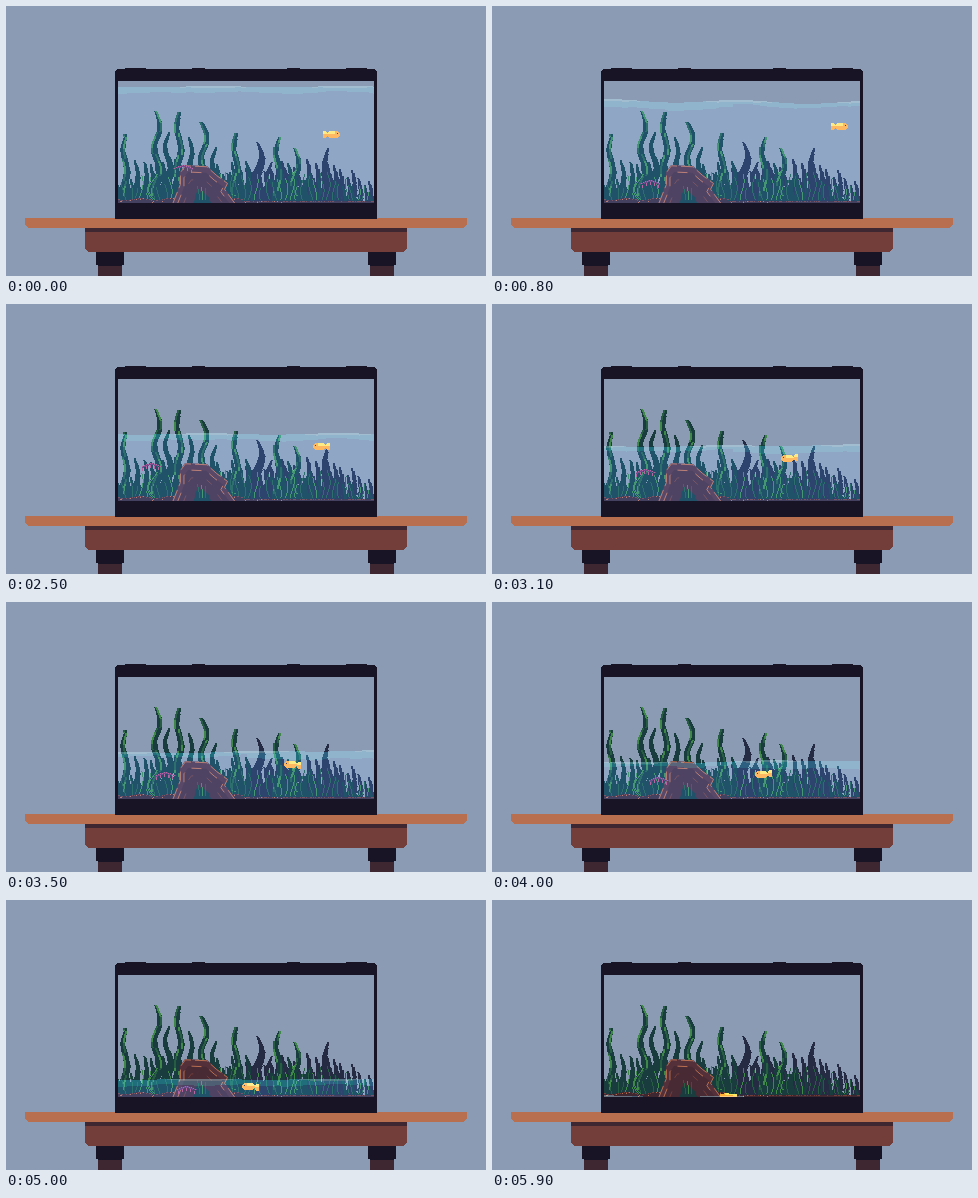
Animation, 480 px wide and 270 px high, one loop 6 s. Source, as an HTML page with a canvas:

```html
<!DOCTYPE html>
<html lang="en">
<head>
<meta charset="utf-8">
<title>Draining aquarium</title>
<style>
  html, body { margin: 0; width: 100%; height: 100%; overflow: hidden; background: #8b9bb4; }
  canvas { display: block; width: 100vw; height: 100vh; image-rendering: pixelated; }
</style>
</head>
<body>
<canvas id="stage" width="480" height="270"></canvas>
<script>
const LOOP = 6000, STEP = 100;
const LEFT = 112, RIGHT = 368, TOP = 75, FLOOR = 197, CENTER = 240;
const INK = '#181425', WALL = '#8b9bb4', MAROON = '#3e2731', BROWN = '#733e39', CLAY = '#b86f50';
const TEAL = '#193c3e', FOREST = '#265c42', LEAF = '#3e8948', NAVY = '#262b44';
const ORANGE = '#feae34', YELLOW = '#fee761', PLUM = '#68386c', PINK = '#b55088';

const stage = document.getElementById('stage').getContext('2d');
const scene = document.createElement('canvas');
scene.width = 480;
scene.height = 270;

function box(c, color, x, y, w, h) {
  c.fillStyle = color;
  c.fillRect(Math.round(x), Math.round(y), Math.round(w), Math.round(h));
}

function inTank(c, paint) {
  c.save();
  c.beginPath();
  c.rect(LEFT, TOP, RIGHT - LEFT, FLOOR - TOP);
  c.clip();
  paint();
  c.restore();
}

function seeded(seed) {
  return () => (seed = (seed * 16807) % 2147483647) / 2147483647;
}

// Linear path through rows of [time, x, y].
function along(path, t) {
  let i = 1;
  while (i < path.length - 1 && path[i][0] < t) i++;
  const [a, b] = [path[i - 1], path[i]];
  const k = (t - a[0]) / (b[0] - a[0]);
  return [1, 2].map(n => Math.round(a[n] + (b[n] - a[n]) * k));
}

// A spike that widens downwards, swaying from side to side.
function frond(c, color, x, top, slim, flare, bend) {
  for (let y = Math.round(top); y < FLOOR; y++) {
    const d = y - top;
    const w = Math.min(slim, 2 + d / 4) + Math.max(0, d - 12) * flare;
    box(c, color, x - w / 2 - bend * Math.cos(d / 7 + 1), y, w, 1);
  }
}

function glint(c, x, top, bend) {
  for (let y = top; y < 190; y++) {
    const d = y - top, edge = x - bend * Math.cos(d / 7 + 1);
    const side = Math.sin(d / 7 + x) > 0 ? 0 : -3;
    box(c, FOREST, edge + side, y, 2, 1);
    if (Math.sin(d / 4 + x) > 0) box(c, LEAF, edge + side, y, 1.5, 1);
  }
}

function strand(c, color, x, top, sway) {
  for (let y = Math.round(top); y < 194; y++) {
    box(c, color, x + sway * Math.sin((y + x) / 6), y, 1, 1);
  }
}

const tallStems = [[119, 128], [151, 105], [173, 106], [198, 116], [230, 127],
  [253, 136], [272, 131], [290, 142], [321, 142]];

function paintThicket(c) {
  const random = seeded(91);
  const crest = x => 152 + 20 * Math.max(0, (x - 310) / 58) ** 1.3 + 7 * Math.max(0, (150 - x) / 38);

  for (let x = LEFT; x < RIGHT + 6; x += 6) {
    frond(c, x > 235 ? NAVY : TEAL, x + random() * 4, crest(x) + random() * 18, 4, 0.22, 1.5);
  }
  for (let x = LEFT; x < RIGHT + 6; x += 5) {
    frond(c, TEAL, x + random() * 4, crest(x) + 14 + random() * 16, 3, 0.25, 1.5);
  }
  tallStems.forEach(([x, top], i) => {
    const navy = x > CENTER && i % 3 === 2, bend = i % 2 ? 3 : -2;
    frond(c, navy ? NAVY : TEAL, x, top, navy ? 6 : 5, navy ? 0.2 : 0.06, bend);
    if (!navy) glint(c, x, top, bend);
    frond(c, navy ? NAVY : TEAL, x + 11, top + 20 + random() * 8, 4, 0.12, -bend);
  });
  for (let x = LEFT + 3; x < RIGHT; x += 6) {
    const bright = random() < 0.4;
    strand(c, bright ? LEAF : FOREST, x + random() * 4, crest(x) + 12 + random() * 18, 2);
  }
  strand(c, LEAF, 146, 168, 5);
  strand(c, LEAF, 147, 168, 5);
}

function paintGravel(c) {
  const random = seeded(37);
  for (let x = LEFT; x < RIGHT; x++) {
    const h = x < 236 ? 4 + Math.round(Math.sin(x / 5)) : 2;
    box(c, MAROON, x, FLOOR - h, 1, h);
    if (random() < 0.35) box(c, BROWN, x, FLOOR - h, 2, 1);
    if (x < 280 && random() < 0.2) box(c, CLAY, x, FLOOR - h + random() * 2, 2, 1);
  }
}

function paintRock(c) {
  const outline = [[166, 198], [174, 178], [174, 166], [179, 159], [201, 160],
    [211, 169], [222, 177], [219, 183], [230, 198]];
  const trace = scale => {
    c.beginPath();
    outline.forEach(([x, y]) => c.lineTo(196 + (x - 196) * scale, 198 + (y - 198) * scale));
  };
  [[1, '#54303a'], [0.82, '#482a34'], [0.3, TEAL]].forEach(([scale, color]) => {
    trace(scale);
    c.fillStyle = color;
    c.fill();
  });
  [0.98, 0.82, 0.62].forEach((scale, i) => {
    trace(scale);
    c.setLineDash([13 - 3 * i, 4 + 5 * i]);
    c.strokeStyle = i < 2 ? CLAY : BROWN;
    c.stroke();
  });
  c.setLineDash([]);
  [192, 195, 198].forEach((x, i) => strand(c, i === 1 ? LEAF : FOREST, x, 180 + i, 1.5));
}

// A slab whose lower corners are cut in steps.
function slab(c, color, x, y, w, h, cut) {
  for (let row = 0; row < h; row++) {
    const inset = Math.max(0, row - h + cut + 1);
    box(c, color, x + inset, y + row, w - 2 * inset, 1);
  }
}

function mirrored(paint, x, w) {
  paint(x);
  paint(2 * CENTER - x - w);
}

function paintFurniture(c) {
  slab(c, CLAY, 19, 212, 442, 10, 3);
  slab(c, BROWN, 79, 222, 322, 24, 3);
  box(c, MAROON, 79, 222, 322, 4);
  mirrored(x => {
    box(c, INK, x, 246, 28, 13);
    box(c, INK, x + 2, 259, 24, 1);
    box(c, MAROON, x + 2, 260, 24, 10);
  }, 90, 28);

  box(c, INK, 111, 63, 258, 1);
  box(c, INK, 110, 64, 260, 1);
  box(c, INK, 109, 65, 262, 10);
  box(c, INK, 109, FLOOR, 262, 16);
  mirrored(x => box(c, INK, x, 62, 21, 1), 119, 21);
  mirrored(x => box(c, INK, x, 62, 13, 1), 186, 13);
  mirrored(x => box(c, INK, x, TOP, 3, FLOOR - TOP), 109, 3);
}

function paintScene(c) {
  box(c, WALL, 0, 0, 480, 270);
  inTank(c, () => {
    paintThicket(c);
    paintGravel(c);
    paintRock(c);
  });
  paintFurniture(c);
}

const fishPath = [[0, 325, 128], [1000, 353, 118], [1500, 340, 117], [2500, 315, 142],
  [4000, 271, 172], [5300, 236, 190], [5900, 236, 195]];
const crawlerPath = [[0, 177, 161], [900, 156, 178], [1500, 141, 170], [2500, 145, 161],
  [5600, 188, 194], [5900, 190, 200]];

function drawCrawler(c, t) {
  const [x, y] = along(crawlerPath, t);
  const dir = t < 1900 ? -1 : 1, beat = t / STEP % 2;
  for (let i = -9; i <= 10; i++) {
    const px = x + i * dir, py = y - Math.round(1.8 * Math.cos(i / 4));
    box(c, i % 2 ? PINK : PLUM, px, py, 1, 1);
    if (i < 7) box(c, PLUM, px, py + 1, 1, 1);
    if ((i + beat + 20) % 4 === 0) box(c, PINK, px, py + 2, 1, 3);
  }
}

function drawFish(c, t) {
  const [x, y] = along(fishPath, t);
  const dir = t < 1000 ? 1 : -1;
  const half = t > 5400 ? 1.6 : 3.4;
  const wag = Math.round(Math.sin(t / 130));
  for (let i = -8; i <= 8; i++) {
    const tail = i < -4;
    const h = Math.round(tail ? Math.min(half, -3.5 - i) : half * Math.sqrt(1 - ((i - 2) / 6.6) ** 2));
    const top = y - h + (tail ? wag : 0);
    box(c, ORANGE, x + i * dir, top, 1, 2 * h + 1);
    box(c, YELLOW, x + i * dir, top, 1, i < 4 ? h : 0);
  }
  if (half > 2) box(c, MAROON, x + 6 * dir, y - 1, 1, 1);
}

function drawWater(c, t) {
  const swell = 0.7 + 1.8 * Math.exp(-(((t - 1300) / 600) ** 2));
  const tilt = Math.sin(2 * Math.PI * t / 5000);
  const level = 81.4 + 0.0197 * t - swell;
  c.globalCompositeOperation = 'screen';
  for (let x = LEFT; x < RIGHT; x++) {
    const side = Math.cos(Math.PI * (x - LEFT) / (RIGHT - LEFT));
    const wave = Math.cos((x - 150) / 21 - (t - 1500) / 420);
    const y = Math.round(level - swell * wave - tilt * side);
    const depth = 6 + Math.round(2 * tilt * Math.sign(side) + 0.7 * Math.sin(x / 14));
    box(c, 'rgb(8,30,58)', x, y, 1, Math.max(0, FLOOR - y));
    box(c, 'rgb(0,38,30)', x, y, 1, depth);
    if (wave > 0) box(c, 'rgb(45,30,20)', x, y, 1, 1 + Math.round(wave));
  }
  c.globalCompositeOperation = 'source-over';
}

function render() {
  const t = Math.floor((performance.now() % LOOP) / STEP) * STEP;
  stage.drawImage(scene, 0, 0);
  inTank(stage, () => {
    drawCrawler(stage, t);
    drawFish(stage, t);
    drawWater(stage, t);
  });
  requestAnimationFrame(render);
}

paintScene(scene.getContext('2d'));
render();
</script>
</body>
</html>
```
